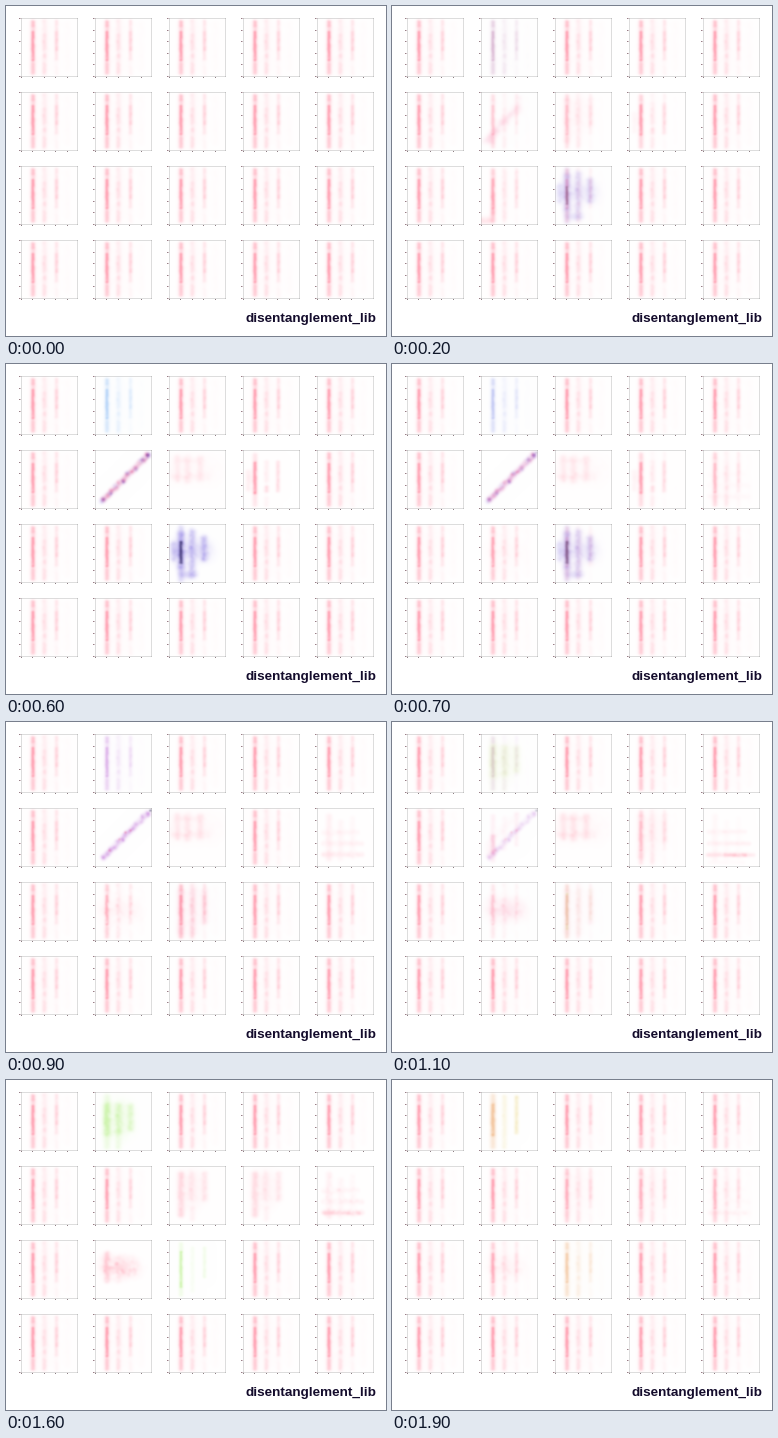
Animation, 380 px wide and 330 px high, one loop 2000 ms. Source, as a matplotlib script:

```python
import numpy as np
import matplotlib.pyplot as plt
from matplotlib.animation import FuncAnimation

W, H, FRAMES, STEP = 380, 330, 20, 100
PW, PH, PITCH, LEFT, TOP = 57, 59, 74, 15, 12

PINK = (1.0, 0.36, 0.48)
ROSE = (0.95, 0.34, 0.56)
BLUE = (0.45, 0.68, 0.95)
ORCHID = (0.74, 0.42, 0.84)
VIOLET = (0.44, 0.36, 0.86)
NAVY = (0.14, 0.10, 0.32)
LIME = (0.70, 0.86, 0.30)
GREEN = (0.60, 0.91, 0.34)
ORANGE = (0.92, 0.62, 0.36)
GOLD = (0.90, 0.80, 0.40)

yy, xx = np.mgrid[0:PH, 0:PW].astype(float)
rng = np.random.default_rng(4)


def smooth_noise(n=420):
    out = np.zeros((PH, PW))
    for x, y, a in zip(rng.uniform(0, PW, n), rng.uniform(0, PH, n),
                       rng.uniform(-1, 1, n)):
        out += a * np.exp(-((xx - x) ** 2 + (yy - y) ** 2) / 4)
    return 1 + 0.2 * np.clip(out, -1.5, 1.5)


NOISE = smooth_noise()


def stroke(x0, y0, x1, y1, s, amp):
    """Soft line segment with a gaussian edge."""
    dx, dy = x1 - x0, y1 - y0
    t = ((xx - x0) * dx + (yy - y0) * dy) / max(dx * dx + dy * dy, 1e-6)
    t = np.clip(t, 0, 1)
    d2 = (xx - x0 - t * dx) ** 2 + (yy - y0 - t * dy) ** 2
    return amp * np.exp(-d2 / (2 * s * s))


def col(x, y0, y1, s, amp):
    return stroke(x, y0, x, y1, s, amp)


def row(y, x0, x1, s, amp):
    return stroke(x0, y, x1, y, s, amp)


def field(*parts):
    clear = np.ones((PH, PW))
    for p in parts:
        clear *= 1 - np.clip(p * NOISE, 0, 1)
    return 1 - clear


def paint(*layers):
    img = np.ones((PH, PW, 3))
    for color, a in layers:
        img *= 1 - a[..., None] * (1 - np.array(color))
    return img


def spots(points, s=1.1, amp=0.5):
    return field(*[stroke(x, y, x, y, s, amp) for x, y in points])


def streaks(k=1.0):
    main = [col(11.5, 14, 41, 1.3, 0.42 * k), col(11.5, 4, 7, 1.5, 0.20 * k),
            col(11.5, 46, 54, 1.5, 0.13 * k), col(11.5, 4, 54, 2.0, 0.17 * k)]
    second = [col(23, 3, 55, 2.0, 0.07 * k), col(23, 17, 30, 1.7, 0.08 * k),
              col(23, 37, 38, 1.6, 0.10 * k), col(23, 46, 53, 1.6, 0.11 * k)]
    third = [col(35, 3, 40, 1.5, 0.12 * k), col(35, 14, 31, 1.5, 0.12 * k),
             col(35, 42, 55, 1.8, 0.04 * k)]
    haze = [col(46, 6, 50, 3, 0.015 * k), col(22, 10, 46, 10, 0.02 * k)]
    return field(*main, *second, *third, *haze)


def broad(k=1.0):
    return field(col(11.5, 14, 40, 2.6, 0.34 * k), col(11.5, 5, 54, 2.6, 0.14 * k),
                 col(23, 14, 38, 2.6, 0.26 * k), col(23, 40, 54, 2.4, 0.14 * k),
                 col(35, 14, 36, 2.4, 0.24 * k), col(24, 20, 34, 9, 0.10 * k))


def cloud(k=1.0):
    return field(col(11.5, 8, 48, 2.4, 0.18 * k), col(22, 8, 32, 2.4, 0.09 * k),
                 col(35, 8, 32, 2.2, 0.12 * k), col(23, 42, 52, 2.2, 0.07 * k),
                 col(22, 16, 30, 9, 0.05 * k))


def patch(k=1.0):
    return field(col(8, 7, 29, 2.4, 0.09 * k), col(18, 8, 30, 2.6, 0.11 * k),
                 col(31, 8, 28, 2.4, 0.10 * k), row(10, 7, 33, 2.2, 0.04 * k),
                 row(26, 4, 38, 2.4, 0.05 * k), row(20, 4, 40, 11, 0.03 * k))


def diagonal(s, k, beads):
    """Rising band with beads that stray a little to either side."""
    t = np.linspace(0, 1, beads)
    off = 1.1 * np.sin(9 * np.arange(beads))
    points = zip(8 + 44 * t + off, 49 - 44 * t + off)
    return field(stroke(8, 49, 52, 5, s, k), spots(points, 1.7, 0.22))


base = paint((PINK, streaks()))
short = paint((PINK, field(
    col(11.5, 13, 42, 1.4, 0.44), col(11.5, 5, 54, 2.0, 0.14),
    col(5, 22, 38, 2.2, 0.09), col(23, 12, 30, 2, 0.08),
    col(23, 37, 40, 1.8, 0.18), col(34.5, 12, 40, 1.6, 0.17),
    col(23, 48, 54, 2, 0.06))))
wisp = field(col(11.5, 12, 46, 1.2, 0.30), col(11.5, 4, 54, 1.8, 0.12),
             col(23, 8, 50, 1.8, 0.06), col(35, 8, 36, 1.5, 0.11))
dusk = field(col(11.5, 10, 42, 2.8, 0.42), col(22.5, 8, 50, 2.6, 0.36),
             col(34.5, 14, 34, 2.4, 0.40), col(11.5, 4, 55, 2.4, 0.22),
             col(4.5, 20, 34, 2.4, 0.28), row(26, 10, 34, 7, 0.18),
             row(50, 13, 24, 2.8, 0.28))
blob = field(row(27, 12, 38, 6, 0.11), row(30, 22, 32, 5, 0.12),
             col(11.5, 14, 38, 2.4, 0.13), col(23, 18, 40, 2.4, 0.08),
             row(18, 8, 36, 3, 0.05))
ground = field(row(46.5, 22, 42, 1.4, 0.36), row(46.5, 4, 50, 1.6, 0.17),
               row(35, 5, 46, 1.6, 0.08), row(23, 5, 42, 1.6, 0.06),
               row(54, 6, 40, 1.8, 0.05))
mesh = field(col(11.5, 8, 50, 2.4, 0.08), col(23, 14, 50, 2.4, 0.05),
             col(35, 10, 48, 2.2, 0.04), row(35, 6, 44, 2, 0.06),
             row(46, 6, 44, 2, 0.09), row(24, 6, 40, 2, 0.04))

# Keyed looks of the panels that move: (row, column) -> {step: picture}
keys = {
    (0, 1): {4: paint((BLUE, streaks(0.85))),
             6: paint((BLUE, streaks(0.85))),
             9: paint((ORCHID, streaks(0.85))),
             13: paint((LIME, broad())),
             16: paint((GREEN, broad())),
             19: paint((ORANGE, field(col(11.5, 13, 42, 1.5, 0.42),
                                      col(11.5, 4, 54, 2.2, 0.22))),
                       (GOLD, field(col(23, 5, 54, 2, 0.15),
                                    col(35, 5, 40, 1.6, 0.28))))},
    (1, 1): {4: paint((ROSE, field(stroke(8, 46, 22, 30, 3, 0.17),
                                   stroke(22, 30, 36, 15, 3, 0.13),
                                   stroke(9, 44, 14, 38, 2.2, 0.20),
                                   stroke(20, 30, 34, 18, 1.8, 0.09),
                                   row(49, 4, 10, 2.5, 0.14),
                                   col(11.5, 10, 50, 2, 0.05),
                                   col(37, 6, 18, 3, 0.08)))),
             6: paint((ROSE, diagonal(2.0, 0.24, 12)),
                      (VIOLET, diagonal(2.2, 0.08, 8)),
                      (VIOLET, spots([(53, 4), (48, 9), (6, 51)], 1.8, 0.2))),
             9: paint((ORCHID, diagonal(2.1, 0.28, 13)),
                      (ROSE, spots([(30, 24), (24, 31), (35, 22), (14, 42)],
                                   1.1, 0.25)),
                      (NAVY, spots([(55, 2)], 1.0, 0.35))),
             13: paint((ROSE, field(col(11.5, 28, 44, 1.6, 0.40),
                                    col(11.5, 8, 52, 2, 0.14),
                                    col(8, 36, 46, 3, 0.10),
                                    col(23, 10, 40, 2.2, 0.07),
                                    col(35, 6, 36, 1.8, 0.13),
                                    stroke(11, 30, 35, 8, 3, 0.05)))),
             16: paint((PINK, streaks(0.95)))},
    (1, 2): {4: paint((PINK, cloud())), 6: paint((PINK, patch(0.85))),
             9: paint((PINK, patch())), 13: paint((PINK, patch(1.2))),
             16: paint((PINK, cloud(1.1)))},
    (1, 3): {4: short, 6: short, 9: base,
             13: paint((PINK, cloud(1.15))), 16: paint((PINK, cloud()))},
    (1, 4): {6: base, 9: paint((PINK, mesh)), 13: paint((PINK, ground)),
             16: paint((PINK, field(mesh, row(46.5, 8, 42, 1.6, 0.13))))},
    (2, 1): {4: paint((PINK, field(col(11.5, 13, 46, 1.5, 0.30),
                                   col(11.5, 30, 48, 1.6, 0.18),
                                   col(11.5, 5, 54, 2, 0.16),
                                   col(23, 6, 50, 2, 0.10),
                                   col(35, 6, 40, 1.6, 0.12),
                                   row(54, 2, 9, 2.6, 0.32)))),
             6: base,
             9: paint((PINK, field(streaks(0.75),
                                   row(28, 10, 36, 7, 0.04)))),
             13: paint((ROSE, blob)),
             16: paint((PINK, field(blob * 0.9, col(11.5, 14, 40, 2, 0.14))))},
    (2, 2): {4: paint((VIOLET, dusk),
                      (NAVY, field(col(11.5, 21, 37, 1.1, 0.50)))),
             6: paint((VIOLET, dusk * 0.85),
                      (NAVY, field(col(11.5, 18, 38, 1.3, 0.56)))),
             9: paint((PINK, streaks(0.95)),
                      (ROSE, field(col(23, 8, 50, 2.8, 0.10),
                                   col(35, 10, 38, 2.8, 0.10),
                                   col(11.5, 10, 50, 3, 0.10)))),
             13: paint((LIME, wisp)), 16: paint((GREEN, wisp)),
             19: paint((ORANGE, streaks(0.85)))},
}


def look(track, n):
    stops = sorted({0: base, FRAMES: base, **track}.items(), key=lambda s: s[0])
    for (a, p), (b, q) in zip(stops, stops[1:]):
        if a <= n <= b:
            t = (n - a) / (b - a)
            return p + (q - p) * t


def add_panel(img, r, c, pic):
    x, y = LEFT + c * PITCH, TOP + r * PITCH
    tile = pic.copy()
    for edge in (np.s_[0, :], np.s_[-1, :], np.s_[:, 0], np.s_[:, -1]):
        tile[edge] *= 0.87
    img[y:y + PH, x:x + PW] = tile
    for k in range(5):
        img[y + PH, x + round(k * 11.4)] = (0.56, 0.50, 0.52)
    for k in range(6):
        ty = y + round(k * 11.6)
        img[ty, x - 2] = (0.60, 0.50, 0.53)
        img[ty, x - 1] = (0.80, 0.74, 0.76)


def picture(n):
    img = np.ones((H, W, 3))
    for r in range(4):
        for c in range(5):
            add_panel(img, r, c, look(keys.get((r, c), {}), n))
    return np.clip(img, 0, 1)


fig = plt.figure(figsize=(W / 100, H / 100), dpi=100, facecolor="white")
ax = fig.add_axes([0, 0, 1, 1])
ax.axis("off")
view = ax.imshow(picture(0), extent=(0, W, H, 0), interpolation="nearest",
                 aspect="auto")
ax.set_xlim(0, W)
ax.set_ylim(H, 0)
ax.text(370.3, 316, "disentanglement_lib", ha="right", va="baseline",
        family="Liberation Sans", weight="bold", size=9.7, color="#140c2c")


def update(n):
    view.set_data(picture(n))
    return [view]


anim = FuncAnimation(fig, update, frames=FRAMES, interval=STEP,
                     repeat=True, repeat_delay=0, blit=False)
plt.show()
```
